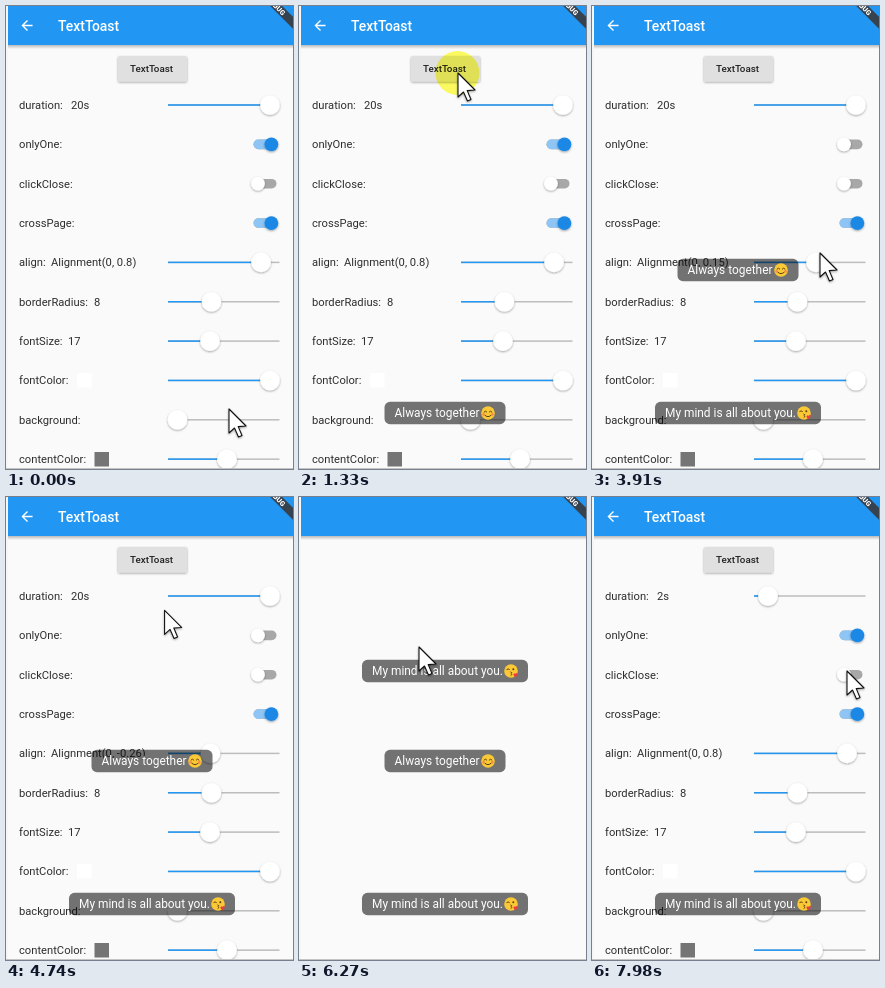
An HTML page that plays this animation: 287x463 px, repeating every 8 s.

```html
<!DOCTYPE html>
<html lang="en">
<head>
<meta charset="utf-8">
<title>TextToast</title>
<style>
  html, body { margin: 0; width: 100%; height: 100%; overflow: hidden; background: #fafafa; }
  svg { display: block; width: 100vw; height: 100vh; }
  text { font-family: Roboto, "Noto Sans", sans-serif; white-space: pre; }
  .label { font-size: 11.2px; fill: #2e2e2e; }
  .msg { font-size: 11.9px; fill: #fff; }
  .bold { font-weight: 500; }
  #press { mix-blend-mode: multiply; }
</style>
</head>
<body>
<svg id="stage" viewBox="0 0 287 463" xmlns="http://www.w3.org/2000/svg">
  <defs>
    <filter id="soft" x="-40%" y="-40%" width="180%" height="190%">
      <feDropShadow dx="0" dy="1" stdDeviation="1.1" flood-color="#000" flood-opacity=".36"/>
    </filter>
    <linearGradient id="fade" x2="0" y2="1">
      <stop offset="0" stop-color="#000" stop-opacity=".26"/>
      <stop offset="1" stop-color="#000" stop-opacity="0"/>
    </linearGradient>
    <clipPath id="screen"><rect x="2" width="285" height="463"/></clipPath>
  </defs>
  <rect width="287" height="463" fill="#f6f6f6"/>
  <g clip-path="url(#screen)">
    <g id="home"></g>
    <g id="page"></g>
    <g id="toasts"></g>
    <g transform="translate(270.3 .1) rotate(45)">
      <rect x="-40" y="-4.2" width="80" height="8.4" fill="#37424f"/>
      <text y="2.5" text-anchor="middle" font-size="7" font-weight="900" fill="#fff">DEBUG</text>
    </g>
  </g>
  <rect y="462" width="287" height="1" fill="#c4c4c4"/>
  <circle id="press" r="22" fill="#ffff62"/>
  <path id="cursor" d="M0 0V24L5.5 19 9.5 28 13 26.5 9.2 17.6 17 17Z" fill="#fff" stroke="#111" stroke-width="1.1" stroke-linejoin="round" filter="url(#soft)"/>
</svg>
<script>
const LOOP = 8000;
const $ = id => document.getElementById(id);

function el(parent, tag, attrs = {}, text = '') {
  const node = document.createElementNS('http://www.w3.org/2000/svg', tag);
  for (const k in attrs) node.setAttribute(k, attrs[k]);
  node.textContent = text;
  return parent.appendChild(node);
}
const set = (node, attrs) => { for (const k in attrs) node.setAttribute(k, attrs[k]); };

const clamp = p => Math.min(1, Math.max(0, p));
const smooth = p => p * p * (3 - 2 * p);
const easeOut = p => 1 - (1 - p) ** 3;
const ramp = (t, start, len) => clamp((t - start) / len);

// Steps are [time, ...values]
function at(steps, t, ease = p => p) {
  let i = steps.findIndex(s => s[0] > t);
  if (i < 0) return steps[steps.length - 1].slice(1);
  if (i === 0) return steps[0].slice(1);
  const a = steps[i - 1], b = steps[i];
  const p = ease((t - a[0]) / (b[0] - a[0]));
  return a.slice(1).map((v, k) => v + (b[k + 1] - v) * p);
}

// --- screens ---
function screen(parent) {
  el(parent, 'rect', { x: 2, width: 285, height: 463, fill: '#fafafa' });
  el(parent, 'rect', { x: 2, y: 39, width: 285, height: 4, fill: 'url(#fade)' });
  el(parent, 'rect', { x: 2, width: 285, height: 39, fill: '#2196f3' });
}

function slider(y, x) {
  const line = { y: y - .75, height: 1.5 };
  el(page, 'rect', { ...line, x: 162, width: 111.5, fill: '#bdbdbd' });
  const active = el(page, 'rect', { ...line, x: 162, fill: '#2196f3' });
  const thumb = el(page, 'circle', { cy: y, r: 9.8, fill: '#fff', filter: 'url(#soft)' });
  const move = x => { set(active, { width: x - 162 }); set(thumb, { cx: x }); };
  move(x);
  return move;
}

function toggle(y, on) {
  const off = el(page, 'rect', { x: 247.5, y: y - 4.8, width: 23, height: 9.6, rx: 4.8, fill: '#a8a8a8' });
  const lit = off.cloneNode();
  set(lit, { fill: '#8ec5f4' });
  page.append(lit);
  const knob = el(page, 'circle', { cy: y, r: 6.9, filter: 'url(#soft)' });
  const mix = (a, b, p) => Math.round(a + (b - a) * p);
  const turn = p => {
    set(lit, { opacity: p });
    set(knob, { cx: 252 + 13.4 * p, fill: `rgb(${mix(255, 30, p)},${mix(255, 136, p)},${mix(255, 229, p)})` });
  };
  turn(on);
  return turn;
}

const label = (x, y, text) => el(page, 'text', { class: 'label', x, y: y + 4 }, text);
const swatch = (x, y, fill) => el(page, 'rect', { x, y, width: 14.5, height: 14.5, fill });

const page = $('page');
screen($('home'));
screen(page);
el(page, 'path', {
  d: 'M20 11H7.83l5.59-5.59L12 4l-8 8 8 8 1.41-1.41L7.83 13H20v-2z',
  fill: '#fff', transform: 'translate(12.7 11.2) scale(.693)'
});
el(page, 'text', { class: 'bold', x: 52, y: 24.6, 'font-size': 13.9, fill: '#fff' }, 'TextToast');
el(page, 'rect', { x: 112, y: 50, width: 69, height: 25.5, rx: 1.5, fill: '#e0e0e0', filter: 'url(#soft)' });
el(page, 'text', { class: 'bold', x: 145.5, y: 66.4, 'font-size': 9.8, fill: '#222', 'text-anchor': 'middle' }, 'TextToast');

const rowY = i => 99 + 39.35 * i;
['duration:', 'onlyOne:', 'clickClose:', 'crossPage:', 'align:', 'borderRadius:',
 'fontSize:', 'fontColor:', 'background:', 'contentColor:']
  .forEach((name, i) => label(13, rowY(i), name));
const durationText = label(65, rowY(0), '');
const alignText = label(45, rowY(4), '');
label(88, rowY(5), '8');
label(62, rowY(6), '17');
swatch(71, 367, '#fff');
swatch(88.5, 446, '#757575');

const setDuration = slider(rowY(0), 264);
const setOnlyOne = toggle(rowY(1), 1);
toggle(rowY(2), 0);
toggle(rowY(3), 1);
const setAlign = slider(rowY(4), 255);
[205.5, 204, 264, 171.5, 221].forEach((x, i) => slider(rowY(i + 5), x));

// --- toasts ---
function face(parent, x, kiss) {
  const g = el(parent, 'g', { transform: `translate(${x} 0)`, fill: 'none', stroke: '#5d4012', 'stroke-width': 1, 'stroke-linecap': 'round' });
  el(g, 'circle', { r: 6.8, fill: '#fcc936', stroke: 'none' });
  if (kiss) {
    el(g, 'path', { d: 'M-4.2-1.6q1.4-1.2 2.6 0M-.2 1q2 .6.4 1.6q1.8.8-.2 1.8' });
    el(g, 'circle', { cx: 2.3, cy: -1.8, r: 1, fill: '#5d4012', stroke: 'none' });
    el(g, 'path', { d: 'M4.6 6.2C1.2 4 2.6 1.4 4.5 2.8 6.2.8 8.4 3 4.6 6.2Z', fill: '#ea3d3d', stroke: 'none' });
  } else {
    el(g, 'path', { d: 'M-4-1q1.4-2 2.8 0M1.2-1q1.4-2 2.8 0M-3.4 2q3.4 3.6 6.8 0' });
    [-4.4, 4.4].forEach(cx => el(g, 'circle', { cx, cy: 1.4, r: 1.3, fill: '#f58b4c', stroke: 'none' }));
  }
}

const LONG = { x: 63, w: 166, face: 212, text: 'My mind is all about you.', kiss: true };
const SHORT = { x: 85.5, w: 121, face: 189, text: 'Always together', kiss: false };

// [start, end, centre y, kind]
const toasts = [
  [620, 850, 407, LONG],
  [850, 1420, 407, SHORT],
  [1420, 7340, 407, LONG],
  [3440, 7340, 264, SHORT],
  [5160, 7340, 174, LONG],
  [7350, 9000, 407, LONG]
].map(([start, end, y, kind]) => {
  const node = el($('toasts'), 'g');
  el(node, 'rect', { x: kind.x, y: -11.2, width: kind.w, height: 22.4, rx: 5.5, fill: '#000', 'fill-opacity': .54 });
  el(node, 'text', { class: 'msg', x: kind.x + 10, y: 4.1 }, kind.text);
  face(node, kind.face, kind.kiss);
  return { node, start, end, y };
});

// --- timeline ---
const path = [
  [60, 223, 403], [480, 159, 67], [1450, 159, 67], [1850, 258, 139], [2220, 258, 139],
  [2440, 252, 257], [2520, 252, 257], [2660, 227, 257], [2790, 224, 257], [2960, 224, 257],
  [3300, 150, 66], [3520, 150, 66], [3860, 228, 247], [3910, 228, 247], [3970, 225, 257],
  [4350, 204, 257], [4490, 204, 257], [4870, 142, 61], [5190, 142, 61], [5480, 36, 34],
  [5570, 22, 20], [5720, 22, 20], [6100, 120, 150], [6500, 120, 150], [7040, 137, 70],
  [7400, 137, 70], [7960, 255, 174]
];
const presses = [
  [520, 620], [740, 850], [1330, 1430], [1920, 2070], [2500, 2930], [3340, 3440],
  [3950, 4440], [5060, 5160], [5600, 5700], [6380, 6480], [7230, 7340]
];
const alignSteps = [[2540, .8], [2660, .65], [2820, .15], [4000, .15], [4380, -.26]];
const POP = 5700, PUSH = 6500, SLIDE = 300;

function draw(t) {
  const fresh = t >= PUSH;

  const align = fresh ? .8 : at(alignSteps, t)[0];
  setAlign(216.9 + 47.7 * align);
  alignText.textContent = `Alignment(0, ${+align.toFixed(2)})`;
  setDuration(fresh ? 176 : 264);
  durationText.textContent = fresh ? '2s' : '20s';
  setOnlyOne(fresh ? 1 : 1 - smooth(ramp(t, 2070, 180)));

  const shown = fresh ? easeOut(ramp(t, PUSH, SLIDE)) : 1 - smooth(ramp(t, POP, SLIDE));
  set(page, { opacity: shown, transform: `translate(0 ${(1 - shown) * 116})` });

  for (const { node, start, end, y } of toasts) {
    const p = easeOut(ramp(t, start, 250)) * (1 - smooth(ramp(t, end, 250)));
    set(node, { opacity: p, transform: `translate(0 ${y + 25 * (1 - p)})` });
  }

  const [x, y] = at(path, t, smooth);
  set($('cursor'), { transform: `translate(${x} ${y})` });
  const down = presses.some(([a, b]) => t >= a && t < b);
  set($('press'), { cx: x - .5, cy: y, visibility: down ? 'visible' : 'hidden' });
}

const begin = performance.now();
function tick() {
  draw((performance.now() - begin) % LOOP);
  requestAnimationFrame(tick);
}
tick();
</script>
</body>
</html>
```
